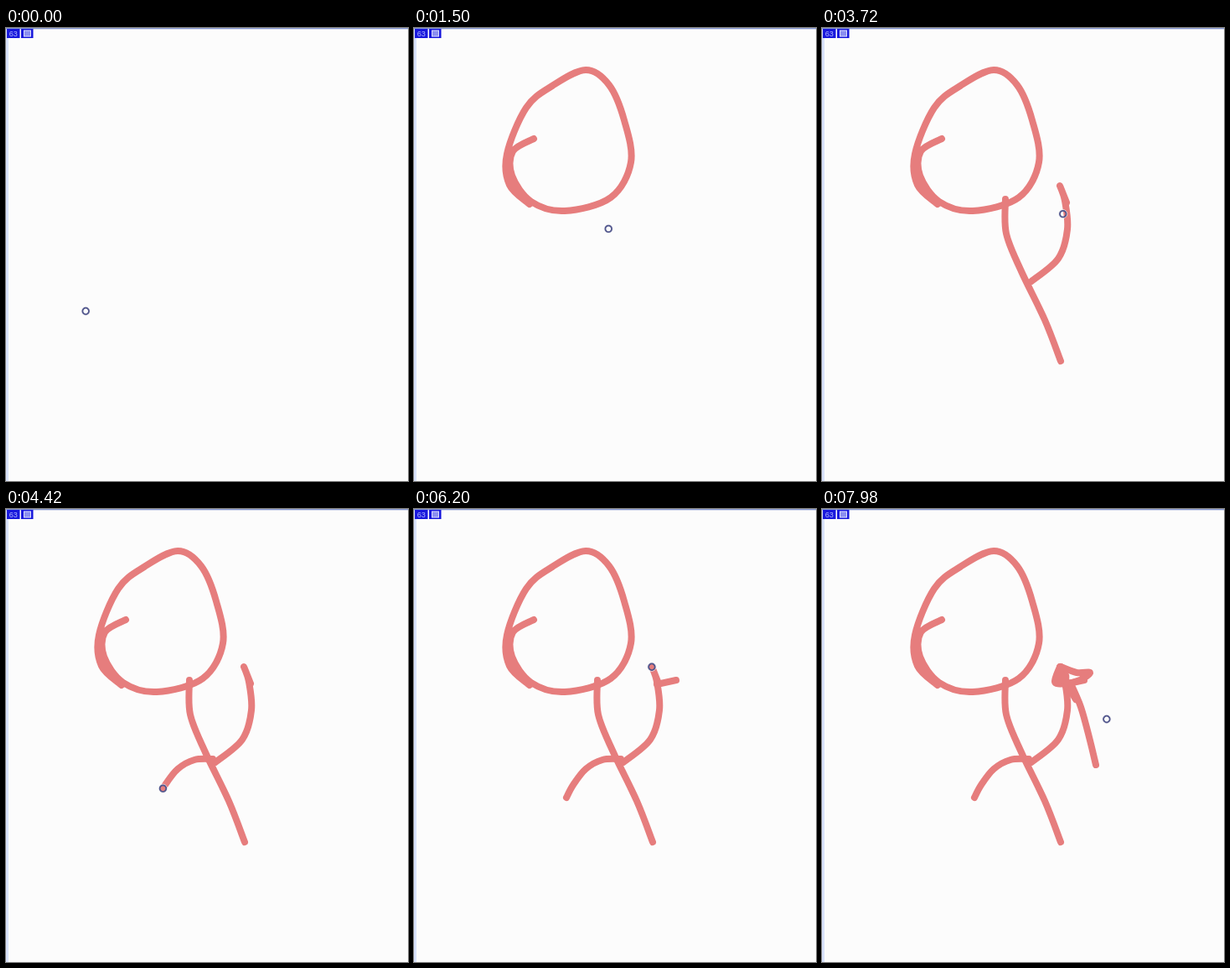
Recreate the animation shown at these times as an HTML page. Size 480 by 540 pixels, loop 8000 ms.

```html
<!DOCTYPE html>
<html lang="en">
<head>
<meta charset="utf-8">
<title>Stick figure sketch</title>
<style>
  html, body { margin: 0; width: 100%; height: 100%; overflow: hidden; background: #fcfcfc; }
  svg { display: block; width: 480px; height: 540px; }
  #trail path { fill: none; stroke-width: 8; stroke-linecap: round; stroke-linejoin: round; }
  .ink { stroke: #e67d7d; }
  text { font: 9px "Liberation Sans", Arial, sans-serif; fill: #b4b8ff; text-anchor: middle; }
</style>
</head>
<body>
<svg viewBox="0 0 480 540">
  <rect width="480" height="540" fill="#fcfcfc"/>
  <rect width="3" height="540" fill="#d9e2fb"/>
  <rect width="480" height="1.3" fill="#8496cf"/>
  <g id="trail"></g>
  <rect x="1" y="1" width="15.5" height="11" fill="#1818dc"/>
  <text x="8.8" y="9.8">63</text>
  <rect x="18" y="1" width="14.5" height="11" fill="#1818dc"/>
  <rect x="21.5" y="3" width="8" height="7" fill="#8b8ff0" stroke="#dcdeff"/>
  <g id="cursor" fill="none">
    <circle r="5" stroke="#e6e6ec"/>
    <circle r="3.8" stroke="#50558c" stroke-width="1.8"/>
  </g>
</svg>
<script>
const LOOP = 8000;
const START = '95,338';

// Each gesture begins when the last one ends: kind, end ms, key points
const gestures = [
  ['move', 920, '168,150 143,132'],
  ['draw', 1380, `143,132 118,147 117,176 140,207 180,218 235,202 259,160 251,110
    233,68 205,50 165,69 134,95 111,150 114,187 138,210`],
  ['move', 1500, '232,239'],
  ['move', 1740, '236,245 219,204'],
  ['draw', 2280, '219,204 220,245 238,290 266,348 285,397'],
  ['move', 2860, '311,270 281,253'],
  ['move', 2990, '250,302'],
  ['draw', 3560, '250,302 282,275 293,240 290,206 284,188 292,208'],
  ['move', 3720, '288,221'],
  ['move', 4060, '258,309 247,298'],
  ['draw', 4480, '247,298 225,299 205,310 190,329 182,344'],
  ['move', 4700, '290,209'],
  ['draw', 4830, '290,209 313,204'],
  ['move', 5220, '280,203'],
  ['move', 6200, '296,190 290,190'],
  ['draw', 6580, '284,188 278,206 290,208 308,204 320,195 304,195 285,188'],
  ['draw', 7320, '285,188 284,204 291,198 292,208 303,227'],
  ['move', 7500, '297,208'],
  ['draw', 7800, '297,208 309,236 319,272 327,305'],
  ['move', LOOP, '340,250'],
];

const trail = document.getElementById('trail');
const cursor = document.getElementById('cursor');
const easeOut = k => 1 - (1 - k) ** 2;

// Catmull-Rom spline as cubic path data
function spline(pts) {
  const at = i => pts[Math.max(0, Math.min(pts.length - 1, i))];
  let d = `M${pts[0]}`;
  for (let i = 0; i < pts.length - 1; i++) {
    const [a, b, c, e] = [at(i - 1), at(i), at(i + 1), at(i + 2)];
    const c1 = b.map((v, k) => v + (c[k] - a[k]) / 6);
    const c2 = c.map((v, k) => v - (e[k] - b[k]) / 6);
    d += `C${c1} ${c2} ${c}`;
  }
  return d;
}

let lastEnd = 0, lastPoint = START;
const steps = gestures.map(([kind, end, text]) => {
  const words = text.split(/\s+/);
  const isInk = kind === 'draw';
  const route = isInk ? words : [lastPoint, ...words];
  const path = document.createElementNS('http://www.w3.org/2000/svg', 'path');
  path.setAttribute('d', spline(route.map(p => p.split(',').map(Number))));
  if (isInk) path.classList.add('ink');
  trail.append(path);
  const step = { isInk, start: lastEnd, end, path, length: path.getTotalLength() };
  lastEnd = end;
  lastPoint = words.at(-1);
  return step;
});

function draw(t) {
  for (const { isInk, start, end, path, length } of steps) {
    const k = Math.max(0, Math.min(1, (t - start) / (end - start)));
    const reach = length * (isInk ? k : easeOut(k));
    if (isInk) {
      path.style.visibility = k > 0 ? 'visible' : 'hidden';
      path.style.strokeDasharray = k < 1 ? `${reach} 2000` : 'none';
    }
    if (t >= start && t < end) {
      const { x, y } = path.getPointAtLength(reach);
      cursor.setAttribute('transform', `translate(${x} ${y})`);
    }
  }
}

const begin = performance.now();
function tick() {
  draw((performance.now() - begin) % LOOP);
  requestAnimationFrame(tick);
}
tick();
</script>
</body>
</html>
```
